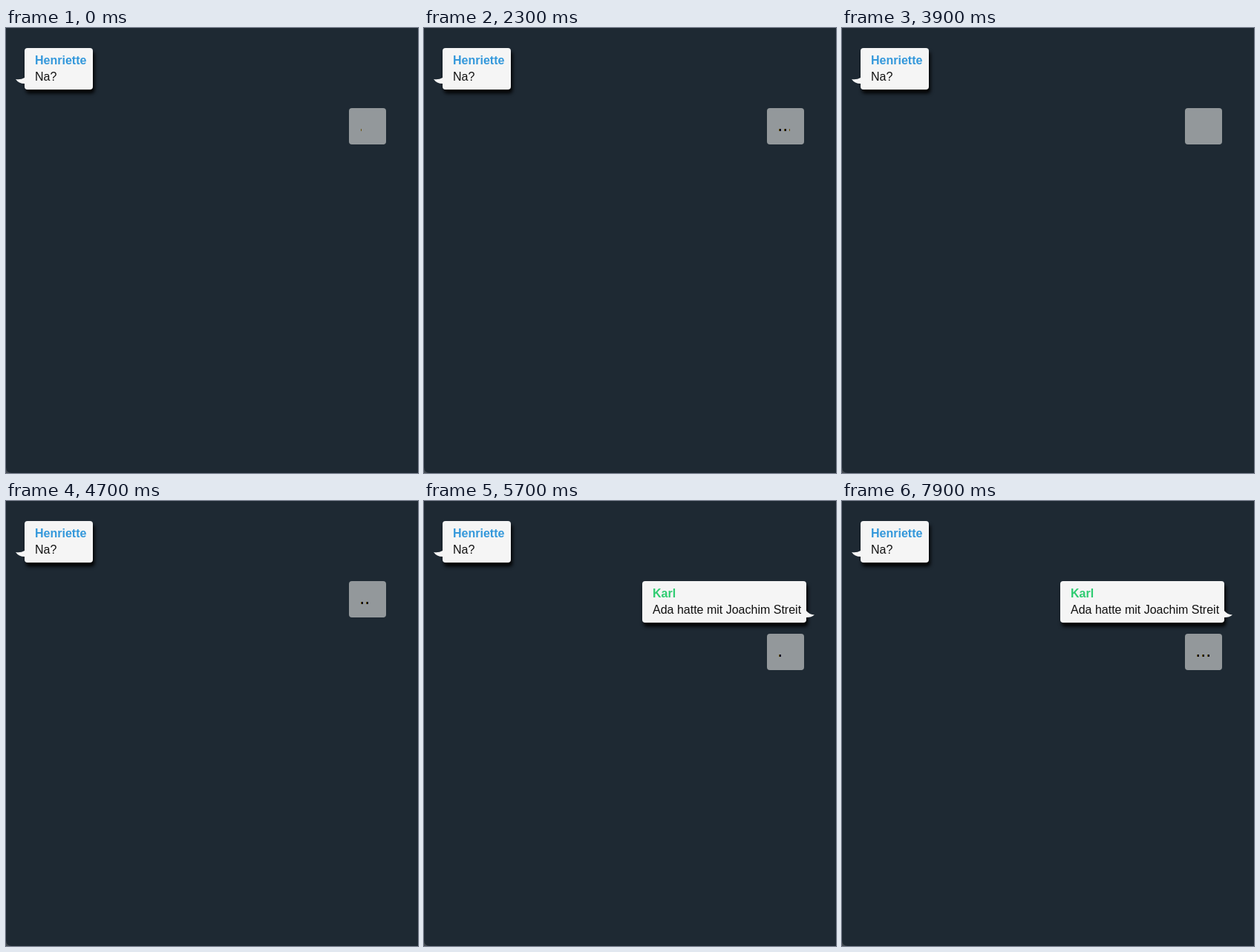
Write an HTML page that moves like this. It is 555x600 px and loops after 8000 ms.

```html
<!DOCTYPE html>
<html lang="de">
<head>
<meta charset="utf-8">
<title>Chat</title>
<style>
  html, body { margin: 0; width: 100%; height: 100%; overflow: hidden; background: #434a51; }
  svg { display: block; }
  text { font: 16px "Liberation Sans", Arial, sans-serif; fill: #111; }
  .name { font-weight: bold; }
  .bubble { fill: #f5f5f5; }
  .box { filter: drop-shadow(2px 5px 2.5px #000); }
</style>
</head>
<body>
<svg width="555" height="600" viewBox="0 0 555 600">
  <defs>
    <clipPath id="c0"><rect height="3"/></clipPath>
    <clipPath id="c1"><rect height="3"/></clipPath>
    <clipPath id="c2"><rect height="3"/></clipPath>
    <g id="dot" shape-rendering="crispEdges">
      <rect width="3" height="3"/>
      <rect width="1" height="3" fill="#6b5413"/>
      <rect x="2" width="1" height="3" fill="#000028"/>
    </g>
  </defs>
  <path d="M0 0H555V600H8Q0 600 0 592Z" fill="#1e2933"/>

  <g transform="translate(25 27)">
    <rect class="bubble box" width="92" height="56" rx="4"/>
    <path class="bubble" d="M0 40Q-5 43-12 42Q-8 48 0 48Z"/>
    <text class="name" x="14" y="22" style="fill:#3498db">Henriette</text>
    <text x="14" y="44">Na?</text>
  </g>

  <g id="reply" transform="translate(294 108)">
    <rect class="bubble box" width="221" height="56" rx="4"/>
    <path class="bubble" d="M221 40Q225 45 232 45.5Q228 49 221 49Z"/>
    <text class="name" x="14" y="22" style="fill:#2ecc71">Karl</text>
    <text x="14" y="44">Ada hatte mit Joachim Streit</text>
  </g>

  <g id="typing">
    <rect width="50" height="49" rx="4" fill="#93989b"/>
    <g transform="translate(16 28)"><use href="#dot" clip-path="url(#c0)"/></g>
    <g transform="translate(23 28)"><use href="#dot" clip-path="url(#c1)"/></g>
    <g transform="translate(30 28)"><use href="#dot" clip-path="url(#c2)"/></g>
  </g>
</svg>
<script>
  const LOOP = 8000, REPLY_AT = 5000;
  const CYCLE = 1363, OFFSET = 221, COLUMN = 85;
  const dotStarts = [203, 660, 1101];
  const reply = document.getElementById("reply");
  const typing = document.getElementById("typing");
  const clips = document.querySelectorAll("clipPath rect");

  function draw(t) {
    const replied = t >= REPLY_AT;
    reply.setAttribute("visibility", replied ? "visible" : "hidden");
    typing.setAttribute("transform", `translate(462 ${replied ? 179 : 108})`);

    // The dots are uncovered from the left, one pixel column at a time.
    const phase = (t + OFFSET) % CYCLE;
    dotStarts.forEach((start, i) => {
      const columns = Math.floor((phase - start) / COLUMN) + 1;
      clips[i].setAttribute("width", Math.max(0, Math.min(3, columns)));
    });
  }

  const begin = performance.now();
  function tick() {
    draw((performance.now() - begin) % LOOP);
    requestAnimationFrame(tick);
  }
  tick();
</script>
</body>
</html>
```
